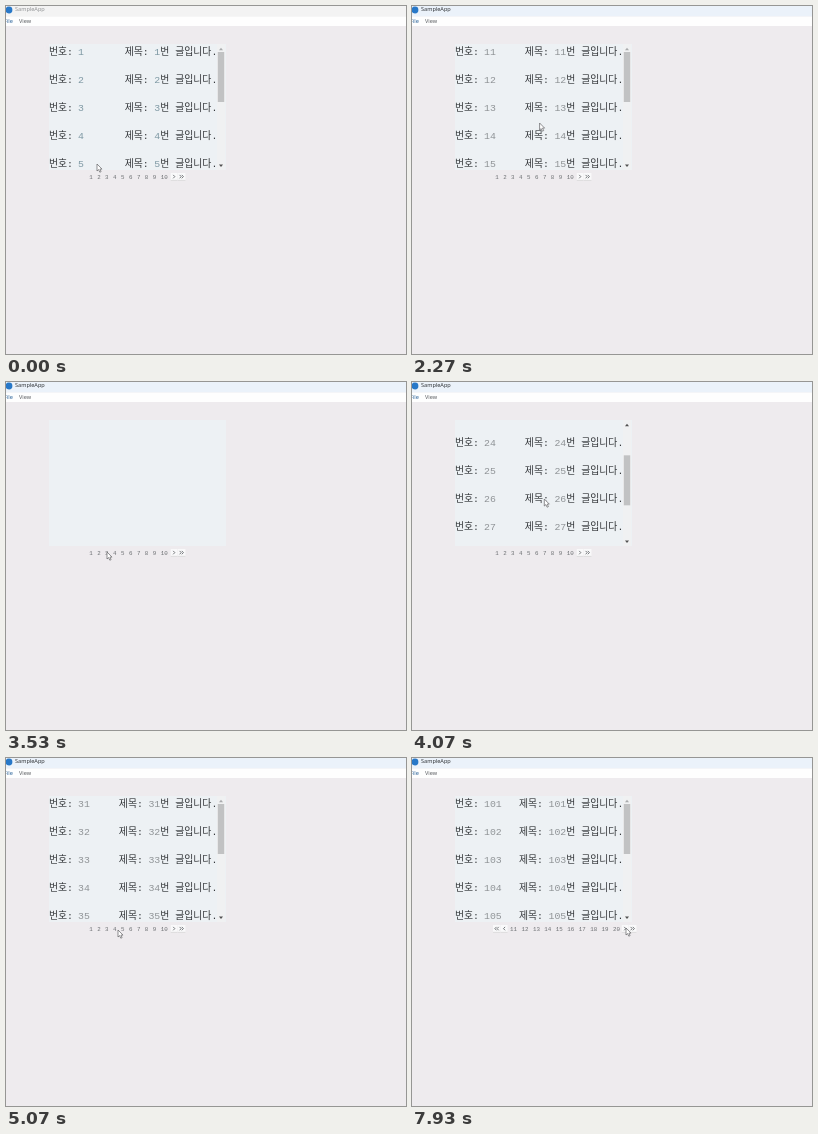
Write an HTML page that moves like this. It is 400x348 px and loops after 8 s.

```html
<!DOCTYPE html>
<html lang="ko">
<head>
<meta charset="utf-8">
<title>SampleApp</title>
<style>
html, body { margin: 0; width: 100%; height: 100%; overflow: hidden; background: #eeebee; }
svg { display: block; width: 100%; height: 100%; }
text { white-space: pre; }
.ui { font: 5.6px "Open Sans", "Noto Sans", sans-serif; }
.row { font: 9.85px "Liberation Mono", "Noto Sans CJK KR", "Noto Sans CJK", monospace; fill: #35383b; }
.page { font: 5.8px "Liberation Mono", monospace; fill: #6a6d70; text-anchor: middle; }
.chevron { fill: none; stroke: #55585c; stroke-width: .8; }
</style>
</head>
<body>
<svg viewBox="0 0 400 348">
  <defs><clipPath id="view"><rect x="42" y="38" width="178" height="126"/></clipPath></defs>
  <rect width="400" height="348" fill="#eeebee"/>
  <rect id="bar" width="400" height="10.5"/>
  <rect y="10.5" width="400" height="9.5" fill="#fefefe"/>
  <circle cx="3" cy="4" r="3.4" fill="#2878c8"/>
  <text id="title" class="ui" x="9" y="5.4">SampleApp</text>
  <text class="ui" x="-2" y="17.3" fill="#1f5a94">File</text>
  <text class="ui" x="13" y="17.3" fill="#55585c">View</text>
  <rect x="43" y="38" width="177" height="126" fill="#edf1f4"/>
  <g id="list">
    <g clip-path="url(#view)"><g id="rows"></g></g>
    <rect x="211" y="38" width="8" height="126" fill="#f0f1f2"/>
    <rect id="thumb" x="211.8" width="6.4" height="50" fill="#c1c2c3"/>
    <path id="up" d="M213 44.2h4l-2-2.4z"/>
    <path id="down" d="M213 158.6h4l-2 2.4z"/>
  </g>
  <g id="pager"></g>
  <path id="cursor" d="M0 0v7l1.6-1.4 1.2 2.6 1.3-.6-1.2-2.5h2.1z" fill="#fff" stroke="#606064" stroke-width=".7" stroke-linejoin="round"/>
</svg>
<script>
const NS = "http://www.w3.org/2000/svg";
const $ = id => document.getElementById(id);

// All times below are in ticks, 15 per second.
const LOOP = 8000, TICKS = 120;
const CHAR = 5.88, PITCH = 28;
const MAX_SCROLL = 154, SCROLL_SPEED = 23, THUMB_TRAVEL = 61;
const LOADING = 5, QUICK_START = 84, QUICK_STEP = 3.8, LAST_PAGE = 11;

const visits = [
  { page: 1, load: 0 },
  { page: 2, load: 28, scroll: [35, 40] },
  { page: 3, load: 57, scroll: [58, 65] },
  { page: 4, load: 75 }
];

const home = { x: 91, y: 158 };
const trips = [
  { from: 1, to: 16, x: 92, y: 171 },
  { from: 23, to: 34, x: 127.6, y: 117 },
  { from: 43, to: 52, x: 101, y: 170 },
  { from: 57, to: 61, x: 132.3, y: 117 },
  { from: 65, to: 70, x: 112, y: 172 },
  { from: 82, to: 93, x: 149, y: 170 },
  { from: 96, to: 103, x: 168, y: 169.5 },
  { from: 115, to: 119, x: 214, y: 170 }
];

const clamp = (v, lo, hi) => Math.min(hi, Math.max(lo, v));
const smooth = p => p * p * (3 - 2 * p);

function add(parent, tag, attrs, content = "") {
  const el = document.createElementNS(NS, tag);
  for (const k in attrs) el.setAttribute(k, attrs[k]);
  el.textContent = content;
  parent.appendChild(el);
  return el;
}

const rows = Array.from({ length: 10 }, (_, i) => {
  const y = 48.8 + i * PITCH;
  const cell = (x, s) => add($("rows"), "text", { class: "row", x, y }, s);
  cell(43, "번호:");
  cell(154.2, "번 글입니다.");
  return { id: cell(72, ""), label: cell(0, "제목:"), num: cell(0, "") };
});

function fillRows(page) {
  const color = page === 1 ? "#7f99a4" : "#8f9396";
  rows.forEach((r, i) => {
    const s = String((page - 1) * 10 + i + 1);
    const start = 154.2 - s.length * CHAR;
    r.id.textContent = r.num.textContent = s;
    r.num.setAttribute("x", start);
    r.label.setAttribute("x", start - 29.6);
    r.id.style.fill = r.num.style.fill = color;
  });
}

function button(x, w, dir, count) {
  const g = $("pager");
  add(g, "rect", { x, y: 167, width: w, height: 7.2, fill: "#f9f9fa" });
  add(g, "path", { d: `M${x} 174.3h${w}`, stroke: "#c9c9cc", "stroke-width": .6 });
  for (let i = 0; i < count; i++) {
    const cx = x + w / 2 + (i - (count - 1) / 2) * 2.2;
    add(g, "path", { class: "chevron", d: `M${cx - dir * .8} 168.9l${dir * 1.6} 1.7l${-dir * 1.6} 1.7` });
  }
}

function fillPager(second) {
  $("pager").textContent = "";
  let x = second ? 98 : 83.2;
  for (let i = 1; i <= 10; i++) {
    const label = String(second ? i + 10 : i), w = label.length * 3.5;
    add($("pager"), "text", { class: "page", x: x + w / 2, y: 172.5 }, label);
    x += w + 4.45;
  }
  if (second) {
    button(81, 7.6, -1, 2);
    button(89, 6.6, -1, 1);
  }
  const right = second ? 209.8 : 164.8;
  button(right, 6.4, 1, 1);
  button(right + 6.8, 7.8, 1, 2);
}

// Page 0 is the empty list while a page loads.
function pageAt(t) {
  if (t >= QUICK_START) return Math.min(LAST_PAGE, 5 + Math.floor((t - QUICK_START) / QUICK_STEP));
  if (visits.some(v => t < v.load && t >= v.load - LOADING)) return 0;
  return visits.filter(v => v.load <= t).pop().page;
}

function scrollAt(t, page) {
  const visit = visits.find(v => v.page === page);
  if (!visit || !visit.scroll) return 0;
  const [from, to] = visit.scroll;
  return Math.min(MAX_SCROLL, SCROLL_SPEED * (clamp(t, from, to) - from));
}

function cursorAt(t) {
  return trips.reduce((pos, trip) => {
    const p = smooth(clamp((t - trip.from) / (trip.to - trip.from), 0, 1));
    return { x: pos.x + (trip.x - pos.x) * p, y: pos.y + (trip.y - pos.y) * p };
  }, home);
}

let shownPage = -1, shownPager = null;

function draw(ms) {
  const t = Math.floor((ms + 4) * TICKS / LOOP) % TICKS;
  const page = pageAt(t);
  if (page !== shownPage) {
    shownPage = page;
    $("list").setAttribute("visibility", page ? "visible" : "hidden");
    if (page) fillRows(page);
  }
  const second = page > 10;
  if (second !== shownPager) fillPager(shownPager = second);

  const scroll = scrollAt(t, page);
  $("rows").setAttribute("transform", `translate(0 ${-scroll})`);
  $("thumb").setAttribute("y", 46 + scroll / MAX_SCROLL * THUMB_TRAVEL);
  $("up").setAttribute("fill", scroll > 0 ? "#505050" : "#a9abad");
  $("down").setAttribute("fill", scroll < MAX_SCROLL ? "#505050" : "#a9abad");

  const active = t >= visits[1].load - LOADING;
  $("bar").setAttribute("fill", active ? "#ebf2fa" : "#f3f3f3");
  $("title").setAttribute("fill", active ? "#25282c" : "#8c8e90");

  const { x, y } = cursorAt(t);
  $("cursor").setAttribute("transform", `translate(${x} ${y})`);
}

function loop() {
  draw(performance.now() % LOOP);
  requestAnimationFrame(loop);
}
loop();
</script>
</body>
</html>
```
